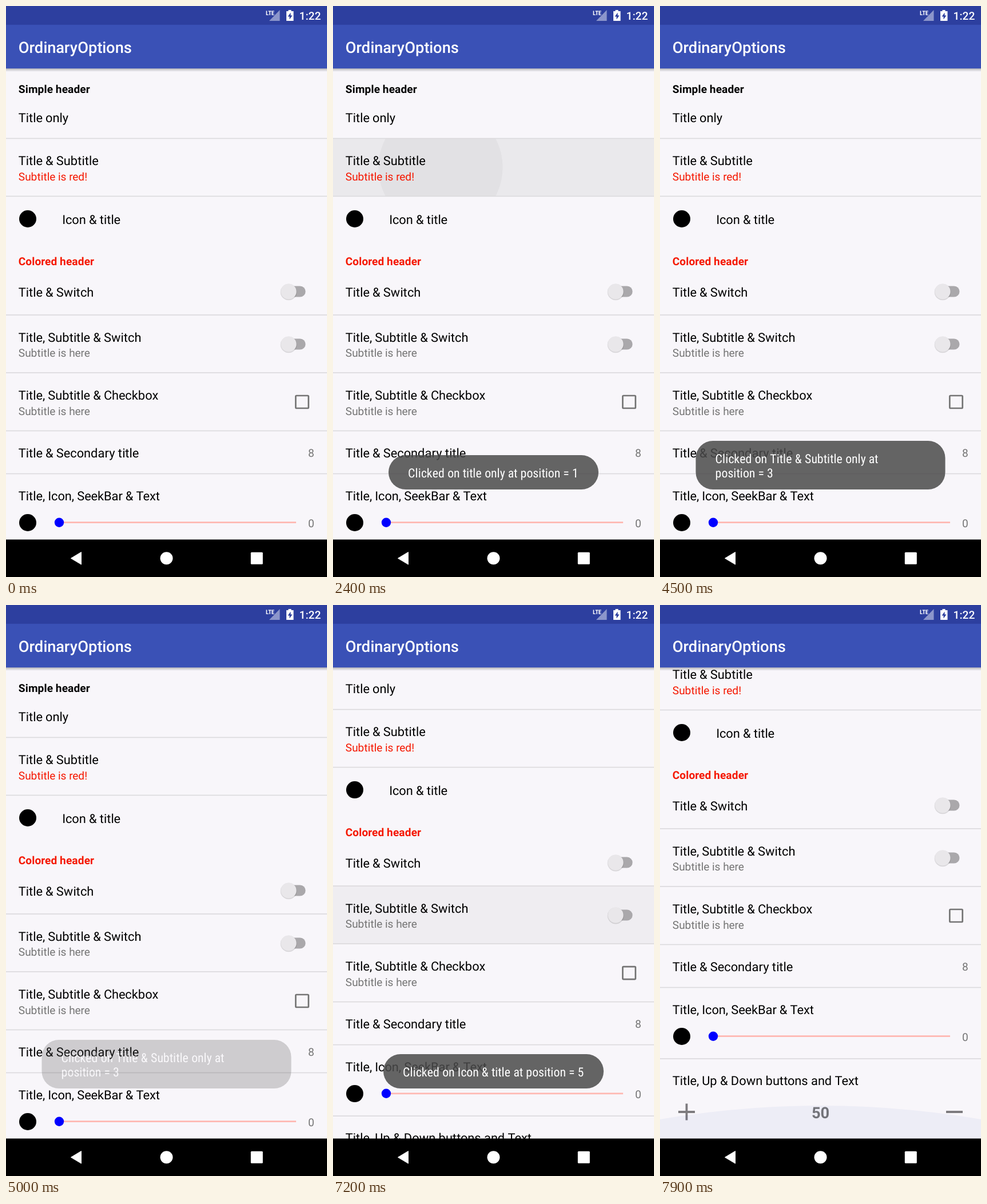
Animation, 561 px wide and 998 px high, one loop 8000 ms. Source, as an HTML page:

```html
<!DOCTYPE html>
<html lang="en">
<head>
<meta charset="utf-8">
<title>Settings list</title>
<style>
  html, body { margin: 0; width: 100%; height: 100%; overflow: hidden; background: #f8f6fa; }
  svg { display: block; width: 100%; height: 100%; }
  text { white-space: pre; text-rendering: geometricPrecision; }
</style>
</head>
<body>
<svg viewBox="0 0 561 998">
  <defs>
    <linearGradient id="shade" x2="0" y2="1">
      <stop stop-color="#000" stop-opacity=".26"/>
      <stop offset="1" stop-color="#000" stop-opacity="0"/>
    </linearGradient>
    <clipPath id="listArea"><path d="M0 109H561V933H0Z"/></clipPath>
    <g id="switch">
      <rect x="484" y="-9.5" width="39.5" height="19" rx="9.5" fill="#aaa8ab"/>
      <circle cx="494" cy="1" r="14.3" opacity=".13"/>
      <circle cx="494" r="13.6" fill="#e9e7ea"/>
    </g>
  </defs>
  <rect width="561" height="998" fill="#f8f6fa"/>
  <g clip-path="url(#listArea)">
    <g id="list"></g>
    <circle id="glow" cx="280.5" r="1645" fill="#3f51b5" opacity=".055"/>
  </g>

  <rect y="109" width="561" height="6" fill="url(#shade)"/>
  <rect width="561" height="109.2" fill="#3a51b6"/>
  <rect width="561" height="32.8" fill="#2d3f9f"/>
  <path d="M478.5 7V26H460Z" fill="#8c96cb"/>
  <path d="M493.5 7h5v2h4v17h-12.5v-17h3.5z" fill="#fff"/>
  <path d="M497.5 11.5l-5 7h3v5l5-7h-3z" fill="#2d3f9f"/>
  <g id="bars"></g>

  <g id="toasts"></g>

  <rect y="932.5" width="561" height="66"/>
  <g fill="#fff">
    <path d="M113.5 965.3L131.5 954.5V976.1Z" stroke="#fff" stroke-linejoin="round"/>
    <circle cx="280.5" cy="965.3" r="11"/>
    <rect x="427.8" y="954.8" width="21" height="21" rx="1.5"/>
  </g>
</svg>
<script>
const LOOP = 8000;
const MAX_SCROLL = 149;
const PIXEL = .5196;  // stage units per device pixel
const SP = 2.625;     // device pixels per text unit
const $ = id => document.getElementById(id);
const clamp = v => Math.min(1, Math.max(0, v));
const ramp = (t, start, length) => clamp((t - start) / length);
const easeOut = p => 1 - (1 - p) ** 2;
const smooth = p => p * p * (3 - 2 * p);

const pen = document.createElement('canvas').getContext('2d');
const measure = (value, font) => {
  if (font) pen.font = font;
  return pen.measureText(value).width;
};
const ROBOTO = 'Roboto, sans-serif';
const CONDENSED = `"Roboto Condensed", ${ROBOTO}`;
const hasCondensed =
  measure('Clicked', `condensed 42px ${CONDENSED}`) < .95 * measure('Clicked', `42px ${ROBOTO}`);

const styles = {
  body: { sp: 16 },
  header: { look: 700, sp: 14 },
  redHeader: { look: 700, sp: 14, fill: '#f51800' },
  sub: { sp: 14, fill: '#757575' },
  redSub: { sp: 14, fill: '#f51800' },
  value: { sp: 14, fill: '#757575', align: 1 },
  count: { look: 700, sp: 20, fill: '#757575', align: .5 },
  bar: { look: 500, sp: 20, fill: '#fff' },
  clock: { look: 500, sp: 14, fill: '#fff' },
  network: { look: hasCondensed ? '700 condensed' : 700, sp: hasCondensed ? 7.8 : 7, fill: '#fff', family: CONDENSED },
  toast: hasCondensed
    ? { look: 'condensed', sp: 16, fill: '#fff', family: CONDENSED }
    : { sp: 14.3, fill: '#fff' },
};

// Glyph advances are whole device pixels, as on the phone.
function text(x, y, value, styleName = 'body') {
  const { look = 400, sp, fill = '#000', align = 0, family = ROBOTO } = styles[styleName];
  const font = size => `${look} ${size}px ${family}`;
  pen.font = font(sp * SP);
  let end = 0;
  const offsets = [...value].map((char, i) => {
    const start = end;
    const next = value[i + 1] || '';
    end += Math.round(measure(char + next) - measure(next));
    return start;
  });
  const xs = offsets.map(offset => (x + (offset - end * align) * PIXEL).toFixed(2));
  return `<text x="${xs.join(' ')}" y="${y}" fill="${fill}" style='font:${font(sp * SP * PIXEL)}'>` +
    `${value.replace(/&/g, '&amp;')}</text>`;
}
const icon = y => `<circle cx="38" cy="${y}" r="15"/>`;
const toggle = y => `<use href="#switch" y="${y}"/>`;
const divider = y => `<rect y="${y - .8}" width="561" height="1.6" fill="#dbd9dc"/>`;

// Pressed rows; "reach" is the time the ripple needs to cover the row.
const presses = [
  { top: 158, height: 73, x: 131, y: 196, start: 450, release: 950, fade: 500, reach: 580 },
  { top: 232, height: 100, x: 131, y: 282, start: 2180, release: 2550, fade: 400, reach: 580 },
  { top: 540, height: 101, start: 7100, release: 7300, fade: 400 },
];
const toasts = [
  { x: 97, width: 367, start: 940, end: 2640, lines: ['Clicked on title only at position = 1'] },
  { x: 62.5, width: 436, start: 3050, end: 4715, lines: ['Clicked on Title & Subtitle only at', 'position = 3'] },
  { x: 88, width: 385, start: 5650, end: 7475, lines: ['Clicked on Icon & title at position = 5'] },
];

const pressMarkup = (p, i) => `
  <clipPath id="row${i}"><rect y="${p.top}" width="561" height="${p.height}"/></clipPath>
  <g id="press${i}" clip-path="url(#row${i})">
    <rect y="${p.top}" width="561" height="${p.height}" opacity=".055"/>
    <circle id="ripple${i}" cy="${p.y || 0}" opacity=".035"/>
  </g>`;

const toastMarkup = (toast, i) => {
  const extra = (toast.lines.length - 1) * 25;
  return `<g id="toast${i}">
    <rect x="${toast.x}" y="${785 - extra}" width="${toast.width}" height="${60 + extra}" rx="30"
      fill="#4a4a4a" opacity=".85"/>
    ${toast.lines.map((line, n) => text(toast.x + 34.1, 823.7 - extra + n * 25.5, line, 'toast')).join('')}
  </g>`;
};

const LEFT = 21.8;
const RIGHT = 539;
$('list').innerHTML = [
  ...presses.map(pressMarkup),
  ...[231.5, 332.5, 540, 641, 742.5, 817.5, 942].map(divider),
  text(LEFT, 152, 'Simple header', 'header'),
  text(LEFT, 203, 'Title only'),
  text(LEFT, 278, 'Title & Subtitle'),
  text(LEFT, 305, 'Subtitle is red!', 'redSub'),
  icon(372), text(98.2, 381, 'Icon & title'),
  text(LEFT, 453, 'Colored header', 'redHeader'),
  text(LEFT, 508, 'Title & Switch'), toggle(499),
  text(LEFT, 586.5, 'Title, Subtitle & Switch'),
  text(LEFT, 613, 'Subtitle is here', 'sub'), toggle(591),
  text(LEFT, 687.5, 'Title, Subtitle & Checkbox'),
  text(LEFT, 714.5, 'Subtitle is here', 'sub'),
  '<rect x="506.3" y="681" width="22.4" height="22" rx="1.5" fill="none" stroke="#757575" stroke-width="2.7"/>',
  text(LEFT, 789, 'Title & Secondary title'), text(RIGHT, 788, '8', 'value'),
  text(LEFT, 864, 'Title, Icon, SeekBar & Text'), icon(903),
  '<path d="M93 902.7H507" stroke="#ffb8b2" stroke-width="2.7"/>',
  '<circle cx="93" cy="902.7" r="8.2" fill="#00f"/>',
  text(RIGHT, 910.5, '0', 'value'),
  text(LEFT, 988, 'Title, Up & Down buttons and Text'),
  '<path d="M32 1035H61M46.5 1020.5V1049.5M500 1035H529" stroke="#7d7b7e" stroke-width="3.8"/>',
  text(280.5, 1045.7, '50', 'count'),
].join('');
$('bars').innerHTML = text(LEFT, 81.5, 'OrdinaryOptions', 'bar') +
  text(454, 15.5, 'LTE', 'network') + text(512.5, 24, '1:22', 'clock');
$('toasts').innerHTML = toasts.map(toastMarkup).join('');

function draw(t) {
  const scroll = MAX_SCROLL * smooth(ramp(t, 7040, 420));
  $('list').setAttribute('transform', `translate(0 ${-scroll})`);

  presses.forEach((p, i) => {
    const visible = ramp(t, p.start, 150) * (1 - ramp(t, p.release, p.fade));
    $('press' + i).setAttribute('opacity', visible);
    if (!p.reach) return;
    const grow = ramp(t, p.start, p.reach);
    $('ripple' + i).setAttribute('cx', p.x + (280.5 - p.x) * grow);
    $('ripple' + i).setAttribute('r', 285 * grow);
  });

  toasts.forEach((toast, i) => {
    const opacity = easeOut(ramp(t, toast.start, 360)) * (1 - ramp(t, toast.end, 400));
    $('toast' + i).setAttribute('opacity', opacity);
  });

  $('glow').setAttribute('cy', 933 + 1645 - 58 * ramp(t, 7520, 380));
}

function tick() {
  draw(performance.now() % LOOP);
  requestAnimationFrame(tick);
}
tick();
</script>
</body>
</html>
```
